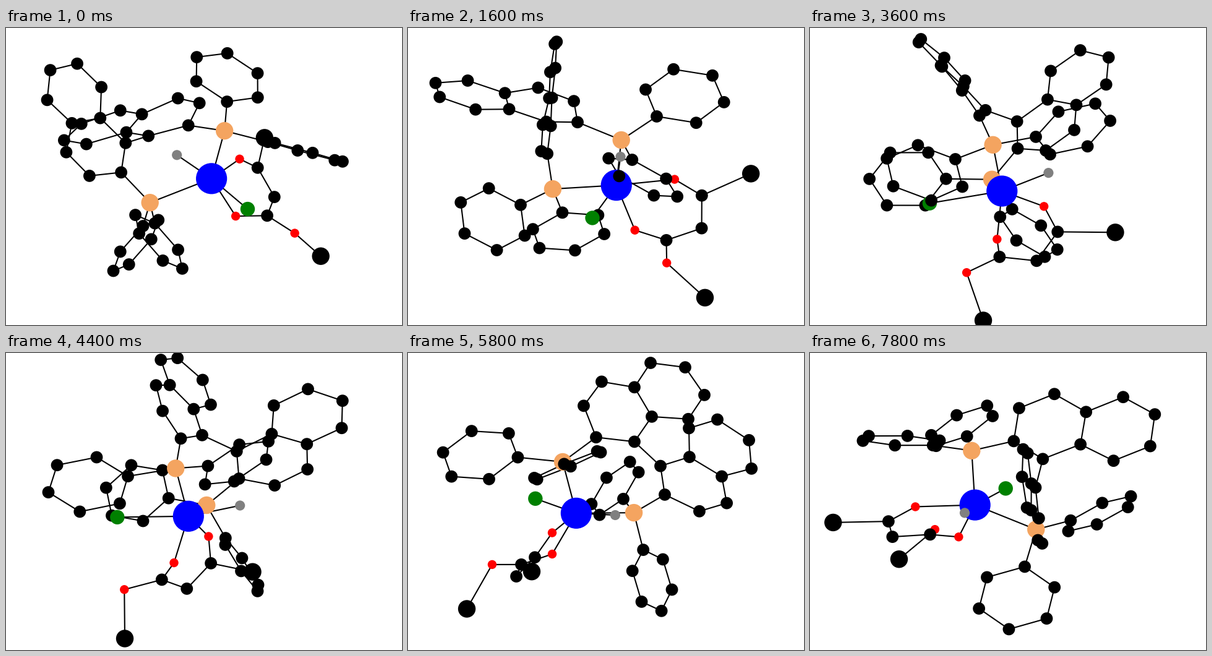
Recreate the animation shown at these times as a matplotlib script. Size 640 px wide and 480 px high, loop 8 s.

```python
import numpy as np
import matplotlib.pyplot as plt
from matplotlib.animation import FuncAnimation
from matplotlib.collections import LineCollection

W, H, DPI = 640, 480, 100
FRAMES, INTERVAL = 40, 200
STEP, START = 6, -174            # degrees per frame, angle at the first frame
CENTER = np.array([301, 250])
TILT = np.arcsin(0.362)
CAMERA = 5200                    # eye distance in pixels

# kind: (colour, diameter in pixels)
KINDS = {
    "metal": ("blue", 50.2),
    "P": ("sandybrown", 28.4),
    "C": ("black", 19.8),
    "Me": ("black", 28.4),
    "O": ("red", 14.4),
    "Cl": ("green", 23.4),
    "H": ("gray", 16.2),
}

# Positions are (right, towards viewer, up as seen on screen) in pixels.
CORE = {
    "M": ("metal", (-29, 23, -0.5)),
    "P1": ("P", (-50.5, 16.7, 79.4)),
    "P2": ("P", (64.6, -36.5, -21.4)),
    "O1": ("O", (-66.6, 112.5, 1.0)),
    "O2": ("O", (-67.9, 31.7, -63.4)),
    "O3": ("O", (-165.4, 22.4, -84)),
    "Ca": ("C", (-93.6, 147.7, -24.8)),
    "Cb": ("C", (-123.7, 124.7, -63.9)),
    "Cc": ("C", (-117.3, 58, -70.4)),
    "Me1": ("Me", (-96.6, 246.7, -9.4)),
    "Me2": ("Me", (-205.5, 69.2, -138.1)),
    "Cl": ("Cl", (-96.5, -73.7, -11.8)),
    "H": ("H", (33.4, 77.4, 16.2)),
}
CORE_BONDS = ("M-P1 M-P2 M-O1 M-O2 M-Cl M-H O1-Ca Ca-Me1 Ca-Cb Cb-Cc "
              "Cc-O2 Cc-O3 O3-Me2")

# Phenyl rings: parent atom, centre, and the two half axes
PHENYLS = [
    ("P1", (-184.6, -40.5, 70.9), (61.4, 24.8, 4.6), (17.2, -52.2, 24.4)),
    ("P1", (-41.9, 150.5, 120.7), (-5.6, -60.8, -19.3), (56.8, -16.1, 18.4)),
    ("P2", (94.4, 16.4, -112.1), (-14.7, -23.2, 41.1), (29.5, -55.3, -10.2)),
    ("P2", (34.4, -175.3, -30.9), (13.6, 63.5, 4.9), (37.4, -14.1, 35.8)),
]

NAPH_A = [(3, -30.8, 102.4), (-17, -52.3, 145.5), (12, -101, 168.2),
          (65.7, -128, 150.6), (93.9, -100.8, 112.1), (65.1, -48.2, 89.4),
          (92.8, -180.6, 173.2), (150.6, -204, 158.6),
          (182, -176.1, 122.5), (154.3, -125.4, 100)]
NAPH_B = [(106.7, -10.2, 63.5), (114.1, -12.2, 16.7), (169.5, 14.5, -0.5),
          (211.9, 47.7, 24.6), (203, 54.7, 69.6), (152.2, 24.5, 89.9),
          (150.6, 30.5, 137.5), (194.3, 64.4, 162.4),
          (243.2, 95, 140.5), (248.3, 89.2, 94)]

points, kinds, bonds = [], [], []


def add(kind, pos):
    points.append(pos)
    kinds.append(kind)
    return len(points) - 1


def chain(ids):
    bonds.extend(zip(ids[:-1], ids[1:]))


def add_phenyl(parent, center, u, v):
    center, u, v = map(np.array, (center, u, v))
    ids = [add("C", center + u * np.cos(t) + v * np.sin(t))
           for t in np.radians(np.arange(0, 360, 60))]
    chain([parent] + ids + ids[:1])


def add_naphthyl(atoms, outer):
    ids = [add("C", p) for p in atoms]
    chain(ids[:6] + ids[:1])
    chain([ids[i] for i in outer])
    return ids


core = {name: add(kind, pos) for name, (kind, pos) in CORE.items()}
for pair in CORE_BONDS.split():
    chain([core[name] for name in pair.split("-")])
for parent, *shape in PHENYLS:
    add_phenyl(core[parent], *shape)
na = add_naphthyl(NAPH_A, [3, 6, 7, 8, 9, 4])
nb = add_naphthyl(NAPH_B, [5, 6, 7, 8, 9, 4])
chain([core["P1"], na[0]])
chain([na[5], nb[0]])
chain([nb[1], core["P2"]])

points = np.array(points, float)
bonds = np.array(bonds)
colors = np.array([KINDS[k][0] for k in kinds])
sizes = np.array([(KINDS[k][1] * 72 / DPI) ** 2 for k in kinds])


def project(angle):
    """Screen positions and depth after turning about the vertical axis."""
    x, y, up = points.T
    c, s = np.cos(angle), np.sin(angle)
    right, near = x * c - y * s, y * c + x * s
    depth = near * np.cos(TILT) + up * np.tan(TILT)
    scale = 1 / (1 - depth / CAMERA)
    drop = near * np.sin(TILT) - up
    return CENTER + np.column_stack([right, drop]) * scale[:, None], depth


fig = plt.figure(figsize=(W / DPI, H / DPI), dpi=DPI, facecolor="white")
ax = fig.add_axes([0, 0, 1, 1])
ax.set_xlim(0, W)
ax.set_ylim(H, 0)
ax.axis("off")

sticks = ax.add_collection(
    LineCollection([], colors="black", linewidths=1.5, zorder=1))
balls = ax.scatter(points[:, 0], points[:, 1], linewidths=0, zorder=2)


def draw(n):
    xy, depth = project(np.radians(START + STEP * n))
    order = np.argsort(depth)
    sticks.set_segments(xy[bonds])
    balls.set_offsets(xy[order])
    balls.set_sizes(sizes[order])
    balls.set_facecolors(colors[order])
    return sticks, balls


anim = FuncAnimation(fig, draw, frames=FRAMES, interval=INTERVAL,
                     init_func=lambda: draw(0), repeat=True, repeat_delay=0)
plt.show()
```
